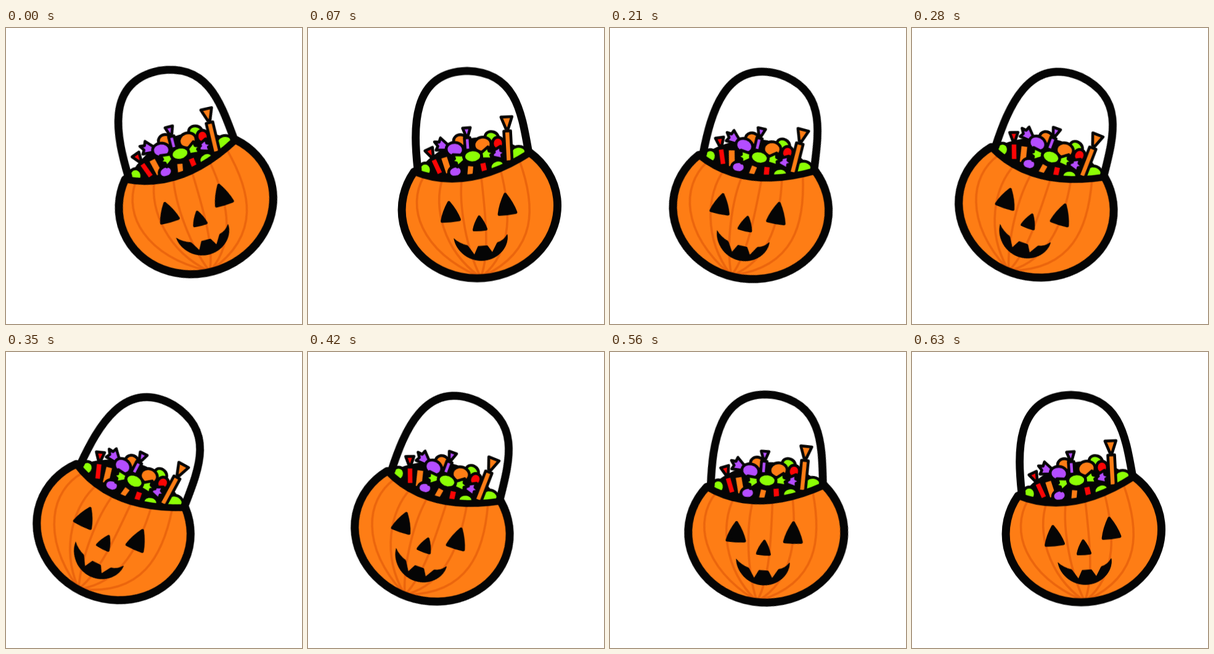
An HTML page that plays this animation: 480x480 px, repeating every 0.7 s.

```html
<!DOCTYPE html>
<html lang="en">
<head>
<meta charset="utf-8">
<title>Swinging candy bucket</title>
<style>
html, body { margin: 0; width: 100%; height: 100%; overflow: hidden; background: #fff; }
svg { display: block; width: 100vw; height: 100vh; }
path { stroke-linejoin: round; stroke-linecap: round; }
</style>
</head>
<body>
<svg viewBox="0 0 480 480"><g id="swing"><g id="art" transform="translate(-275 -280.6)"></g></g></svg>
<script>
const INK = '#050505', ORANGE = '#fe7d15', RIB = '#eb650d';
const GREEN = '#8cff05', PURPLE = '#b44dff', RED = '#fc0505';
const art = document.getElementById('art');

function draw(d, fill, width = 4.6, stroke = INK, transform = '') {
  const path = document.createElementNS('http://www.w3.org/2000/svg', 'path');
  const attrs = { d, fill, stroke, 'stroke-width': width, transform };
  for (const key in attrs) path.setAttribute(key, attrs[key]);
  art.append(path);
}

const line = (d, width, stroke) => draw(d, 'none', width, stroke);
const place = (x, y, turn) => `translate(${x} ${y}) rotate(${turn})`;

// Candy parts
const sweet = (color, x, y, rx, ry, turn = 0) =>
  draw(`M${-rx},0A${rx},${ry} 0 1 1 ${rx},0A${rx},${ry} 0 1 1 ${-rx},0Z`, color, 4.6, INK, place(x, y, turn));

const fan = (color, x, y, turn) =>
  draw('M0,-4L14,-11L14,-4L22,0L15,3L16,10L0,5Z', color, 4.6, INK, place(x, y, turn));

function stick(color, x, y, width, length, turn, tip) {
  const at = place(x, y, turn), w = width / 2;
  draw(`M${-w},0H${w}V${length}H${-w}Z`, color, 4.6, INK, at);
  if (tip) draw(`M${-9 * tip},${-23 * tip}H${9 * tip}L2,-4H-2Z`, color, 4.6, INK, at);
}

function candies() {
  draw('M178,234Q196,207 240,186Q300,164 356,204Q258,267 178,234Z', INK, 2);
  sweet(ORANGE, 247, 183, 11, 10);
  stick(PURPLE, 258, 178, 9, 20, -4, 0.7);
  sweet(GREEN, 298, 177, 11, 9, 15);
  sweet(RED, 308, 187, 9, 10);
  sweet(ORANGE, 283, 189, 14, 12, -10);
  sweet(GREEN, 341, 204, 14, 12, -10);
  sweet(GREEN, 190, 230, 10, 11);
  stick(ORANGE, 220, 208, 14, 30, -18);
  stick(RED, 203, 212, 12, 28, -25, 0.75);
  fan(PURPLE, 225, 194, 205);
  sweet(PURPLE, 238, 197, 14, 11.5, 5);
  fan(PURPLE, 299, 204, -5);
  sweet(PURPLE, 239, 233, 11, 9, -15);
  stick(ORANGE, 264, 222, 13, 18, 5);
  stick(RED, 283, 217, 13, 20, -12);
  sweet(GREEN, 307, 224, 12, 9.5, -20);
  fan(GREEN, 253, 211, 165);
  fan(GREEN, 281, 207, -15);
  sweet(GREEN, 267, 208, 14.5, 10.5, -4);
  stick(ORANGE, 323, 167, 11, 50, -3, 1);
}

function bucket() {
  const side = 'M172,233A126.5,114 -9 1 0 360,202';
  const rim = 'Q258,268 172,233';
  draw(side + rim + 'Z', ORANGE, 0);
  for (let i = -2.5; i <= 2.5; i++) {
    line(`M${265 + 31 * i},${240 - 5.5 * i - 2 * i * i}
      C${265 + 42 * i},290 ${277 + 38 * i},360 ${280 + 2 * i},402`, 3.5, RIB);
  }
  line('M178,230C171,165 166,72 258,69.5C337,72 346,135 358,203', 12.8);
  line(side, 13);
  line('M360,202' + rim, 11);
}

const wedge = (x, y, w, h, turn) =>
  draw(`M0,${-h}Q${w * 0.36},${-h / 2} ${w / 2},0Q0,1 ${-w / 2},0Q${-w * 0.36},${-h / 2} 0,${-h}Z`,
    INK, 5, INK, place(x, y, turn));

function face() {
  wedge(231.5, 312, 28, 29, -6);
  wedge(323.5, 300.5, 27, 31, -7);
  wedge(279, 326.5, 19, 20, -4);
  draw(`M237,342C240,360 258,377 281,377C308,377 326,355 323,335Q317,345 307,348
    L299,364L291,353L276,354L270,368L259,353Q246,350 237,342Z`, INK, 1);
}

candies();
bucket();
face();

// Extreme and passing poses: turn, x and y; the rest lie halfway between.
const right = [-10.3, 303, 273.8], upright = [0, 275, 280.6];
const leaning = [17.2, 228.4, 281.7], left = [31.2, 177.4, 275.7];
const between = (a, b) => a.map((v, i) => (v + b[i]) / 2);
const out = [right, upright, between(upright, leaning), leaning, between(leaning, left), left];
const cycle = [...out, ...out.slice(0, -1).reverse()];

document.getElementById('swing').animate(cycle.map(([turn, x, y]) => ({
  transform: `translate(${x}px, ${y}px) rotate(${turn}deg)`,
  easing: 'steps(1, end)'
})), { duration: 700, iterations: Infinity });
</script>
</body>
</html>
```
